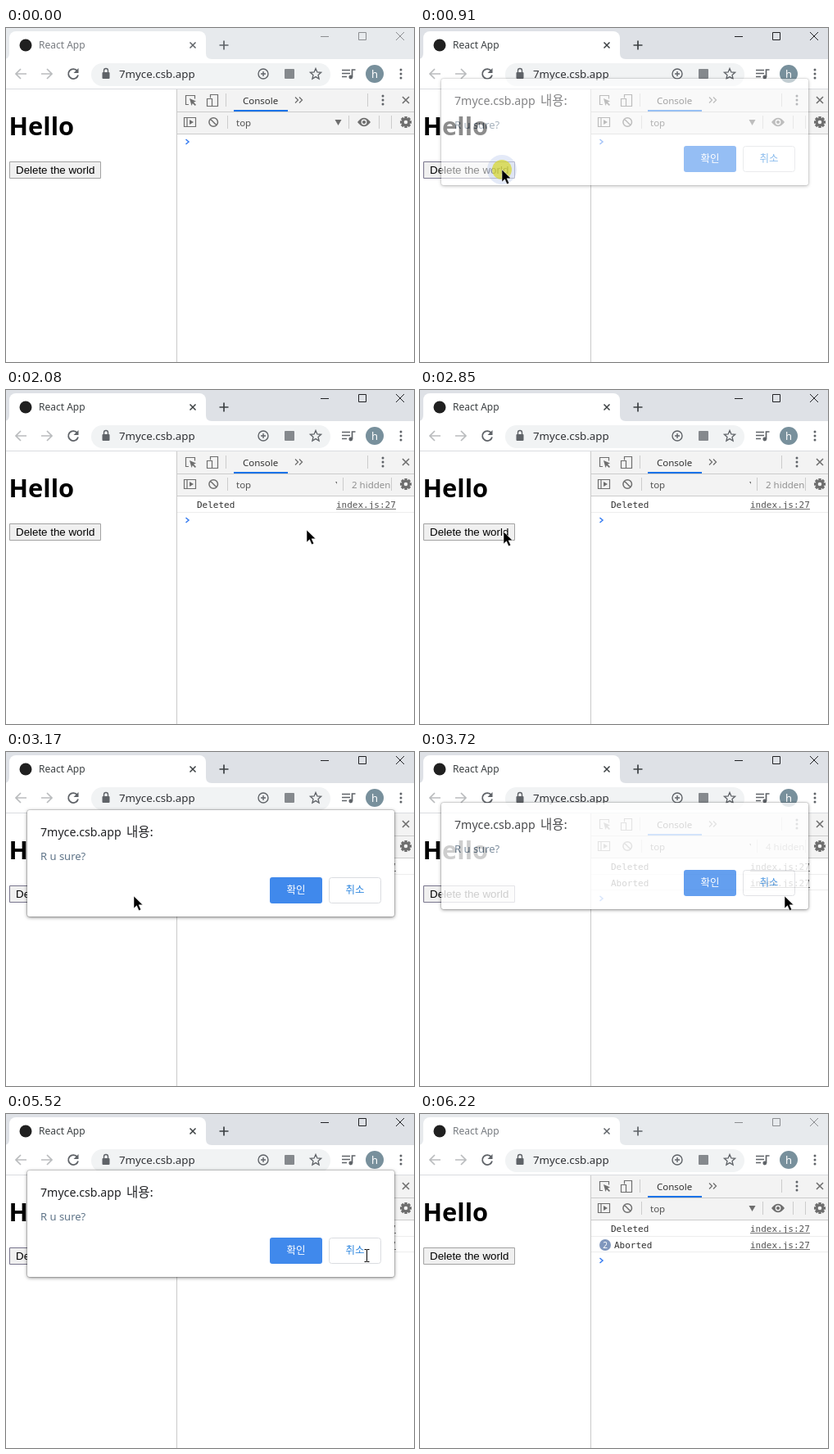
These frames come from a looping animation (498 px wide and 408 px high, 6.3 s). An HTML page with a canvas:

```html
<!DOCTYPE html>
<html lang="ko">
<head>
<meta charset="utf-8">
<title>Confirm dialog</title>
<style>
html, body { margin: 0; width: 100%; height: 100%; overflow: hidden; background: #fff; }
canvas { display: block; width: 498px; height: 408px; }
</style>
</head>
<body>
<canvas id="stage" width="498" height="408"></canvas>
<script>
const stage = document.getElementById('stage').getContext('2d');
const layer = document.createElement('canvas');
layer.width = 498;
layer.height = 408;
const layerCtx = layer.getContext('2d');
let ctx = stage;

const LOOP = 6300;
const UI = '"Noto Sans", "Noto Sans CJK KR", sans-serif';
const KR = '"Noto Sans CJK KR", "Noto Sans CJK", sans-serif';
const MONO = '"DejaVu Sans Mono", monospace';
const GRAY = '#5f6368';

// open: first visible step, close: first closing step, gone: how long closing lasts
const dialogs = [
  { open: 902, close: 1840, gone: 220 },
  { open: 3013, close: 3639, gone: 220 },
  { open: 4733, close: 5515, gone: 150 }
];
const clicks = [750, 1680, 2930, 3560, 4650, 5350];
const moves = [
  { t0: 110, t1: 667, from: [209, 297], bend: [150, 215], to: [100, 173] },
  { t0: 980, t1: 1380, from: [100, 173], bend: [230, 178], to: [367, 171] },
  { t0: 2210, t1: 2850, from: [367, 171], bend: [240, 214], to: [102, 173] },
  { t0: 3040, t1: 3550, from: [102, 173], bend: [270, 183], to: [445, 176] },
  { t0: 3750, t1: 4570, from: [445, 176], bend: [250, 256], to: [64, 178] },
  { t0: 4890, t1: 5360, from: [64, 178], bend: [260, 184], to: [440, 173] }
];

function rect(x, y, w, h, color) {
  ctx.fillStyle = color;
  ctx.fillRect(x, y, w, h);
}

function box(x, y, w, h, r, fill, stroke) {
  ctx.beginPath();
  ctx.roundRect(x, y, w, h, r);
  if (fill) { ctx.fillStyle = fill; ctx.fill(); }
  if (stroke) { ctx.strokeStyle = stroke; ctx.lineWidth = 1; ctx.stroke(); }
}

function disc(x, y, r, color) {
  ctx.beginPath();
  ctx.arc(x, y, r, 0, Math.PI * 2);
  ctx.fillStyle = color;
  ctx.fill();
}

function line(d, color = GRAY, width = 1.5) {
  ctx.strokeStyle = color;
  ctx.lineWidth = width;
  ctx.stroke(new Path2D(d));
}

function shape(d, color = GRAY) {
  ctx.fillStyle = color;
  ctx.fill(new Path2D(d));
}

function text(str, x, y, font, color, align = 'left') {
  ctx.font = font;
  ctx.fillStyle = color;
  ctx.textAlign = align;
  ctx.fillText(str, x, y);
}

function cross(x, y, r, color, width) {
  line(`M${x - r} ${y - r}l${2 * r} ${2 * r}m0 ${-2 * r}l${-2 * r} ${2 * r}`, color, width);
}

function dots(x, y, gap) {
  for (let i = -1; i <= 1; i++) disc(x, y + i * gap, 1.5, GRAY);
}

function drawTabs(active) {
  const ink = active ? '#202124' : '#8b8d90';
  rect(0, 0, 498, 38, active ? '#dee1e6' : '#e7eaed');
  box(4, 4, 240, 40, [8, 8, 0, 0], '#fff');
  shape('M4 31q0 7-7 7h7zM244 31q0 7 7 7h-7z', '#fff');
  disc(24, 21, 7.5, '#202020');
  text('React App', 40, 25, '12px ' + UI, active ? '#3c4043' : '#777b80');
  cross(228, 21, 3.5, active ? '#3c4043' : GRAY, 1.5);
  line('M260.5 21h11M266 15.5v11', active ? '#3c4043' : GRAY, 1.7);
  line('M384 10.5h10M430.5 5.5h9v9h-9zM476 5l10 10m0-10l-10 10', ink, 1);
}

function drawAddressBar() {
  rect(0, 38, 498, 37, '#fff');
  rect(0, 74, 498, 1, '#dadce0');
  line('M25 56H12m6-6l-6 6 6 6M43 56h13m-6-6l6 6-6 6', '#babcbe', 1.7);
  line('M87 52.5a6 6 0 1 0 1 5', GRAY, 1.8);
  shape('M88.5 49v6h-6z');
  box(104, 43, 292, 28, 14, '#f1f3f4');
  box(117.5, 54, 9, 8, 1, GRAY);
  line('M119.5 54v-2a2.5 2.5 0 0 1 5 0v2', GRAY, 1.4);
  text('7myce.csb.app', 138, 61, '13.3px ' + UI, '#303236');
  line('M320 56a6 6 0 1 0-12 0a6 6 0 1 0 12 0M311 56h6m-3-3v6', GRAY, 1.4);
  box(340, 50, 12, 12, 1, '#85898d');
  line('M378 49.5l1.9 4.4 4.7.4-3.6 3.1 1.1 4.7-4.1-2.5-4.1 2.5 1.1-4.7-3.6-3.1 4.7-.4z', GRAY, 1.3);
  line('M410 51.5h10M410 55.5h10M410 59.5h6M422.5 60v-9h4', GRAY, 1.7);
  disc(420.8, 60, 2.4, GRAY);
  disc(450, 56, 11, '#78909c');
  text('h', 450, 60.5, '13px ' + UI, '#fff', 'center');
  dots(482, 56, 5);
}

function drawPage(pressed) {
  text('Hello', 3.5, 131, 'bold 30.8px ' + UI, '#000');
  box(4.5, 163.5, 111, 20, 0, '#f0f0f0', pressed ? '#77748c' : '#a2a2a2');
  text('Delete the world', 12, 178, '13.33px "Liberation Sans", Arial, sans-serif', '#000');
}

function drawGear(x, y) {
  for (let i = 0; i < 4; i++) {
    ctx.save();
    ctx.translate(x, y);
    ctx.rotate(i * Math.PI / 4);
    rect(-1.7, -7, 3.4, 14, '#6e6e6e');
    ctx.restore();
  }
  disc(x, y, 5.2, '#6e6e6e');
  disc(x, y, 2.3, '#f3f3f3');
}

function drawToolbars(hidden) {
  const divider = (x, y) => rect(x, y, 1, 16, '#ccc');
  rect(208, 75, 1, 333, '#cacaca');
  rect(209, 75, 289, 55, '#f3f3f3');
  rect(209, 102, 289, 1, '#ccc');
  rect(209, 129, 289, 1, '#ccc');

  line('M223 93.5h-3.5v-11h11v4', '#6e6e6e', 1.2);
  shape('M224 86l8 3.5-3 1.3 3 3-1.2 1.2-3-3-1.3 3z', '#6e6e6e');
  line('M249.5 85.5v-4h9v14h-7M245.5 86.5h6v9h-6z', '#6e6e6e', 1.2);
  divider(268, 80);
  text('Console', 289, 93, '11.5px ' + UI, '#333');
  rect(278, 100, 66, 2, '#1a73e8');
  line('M353 84.5l3.5 3.5-3.5 3.5M358 84.5l3.5 3.5-3.5 3.5', '#6e6e6e', 1.3);
  divider(441, 80);
  dots(460, 88, 5);
  cross(488, 88, 4, '#6e6e6e', 1.6);

  line('M217.5 109.5h14v11h-14zM221 109v12', '#6e6e6e', 1.2);
  shape('M224 112l5 3-5 3z', '#6e6e6e');
  line('M258.5 115a5.3 5.3 0 1 0-10.6 0a5.3 5.3 0 1 0 10.6 0M249.5 111.3l7.4 7.4', '#6e6e6e', 1.5);
  divider(270, 107);
  text('top', 281, 120, '11.5px ' + UI, '#555');
  if (hidden) {
    shape('M402 112h2v3z', '#6e6e6e');
    divider(411, 107);
    text(hidden + ' hidden', 422, 120, '11.5px ' + UI, '#919191');
  } else {
    shape('M401.5 112h8l-4 7z', '#6e6e6e');
    divider(418, 107);
    shape('M429 115q8-10.5 16 0q-8 10.5-16 0', '#6e6e6e');
    disc(437, 115, 3.4, '#f3f3f3');
    disc(437, 115, 2.1, '#6e6e6e');
    divider(455, 107);
  }
  divider(470, 107);
  drawGear(488, 115);
}

function drawConsole(runs) {
  const rows = Math.min(runs, 2);
  ['Deleted', 'Aborted'].slice(0, rows).forEach((message, i) => {
    const y = 144 + i * 20;
    const counted = i === 1 && runs === 3;
    if (counted) {
      disc(226, y - 4, 7, '#8097bd');
      text('2', 226, y, '10px ' + UI, '#fff', 'center');
    }
    text(message, counted ? 237 : 233, y, '11px ' + MONO, '#303030');
    text('index.js:27', 403, y, '11px ' + MONO, '#545454');
    rect(403, y + 1, 73, 1, '#777');
    rect(209, 149 + i * 19, 289, 1, '#ededed');
  });
  const y = 139 + rows * 20;
  line(`M219.5 ${y - 3}l3.5 3-3.5 3`, '#367cf1', 1.5);
}

function drawDialog(y, hover) {
  ctx.shadowColor = 'rgba(0,0,0,.5)';
  ctx.shadowBlur = 4;
  ctx.shadowOffsetY = 1;
  box(26, y, 448, 130, 3, '#fff');
  ctx.shadowColor = 'transparent';
  box(25.5, y - .5, 449, 131, 3, null, 'rgba(0,0,0,.12)');
  text('7myce.csb.app', 42, y + 32, '14.2px ' + UI, '#202124');
  text('내용:', 147, y + 32, '15.5px ' + KR, '#202124');
  text('R u sure?', 42, y + 61, '13px ' + UI, '#5f7488');
  if (hover) box(321, y + 81, 66, 34, 4, '#a9c9f6');
  box(322, y + 82, 64, 32, 3, hover ? '#4990ed' : '#4089ec');
  text('확인', 354, y + 102, '12.5px ' + KR, '#fff', 'center');
  box(394.5, y + 82.5, 63, 31, 3, '#fff', '#dadce0');
  text('취소', 426, y + 102, '12.5px ' + KR, '#2d86df', 'center');
}

// Fades the dialog as one group, so its parts do not show through each other.
function fadeDialog(pose, hover) {
  ctx = layerCtx;
  ctx.clearRect(0, 0, 498, 408);
  drawDialog(pose.y, hover);
  ctx = stage;
  ctx.globalAlpha = pose.alpha;
  ctx.drawImage(layer, 0, 0);
  ctx.globalAlpha = 1;
}

function dialogPose(d, t) {
  const closing = t - d.close;
  if (t < d.open || closing > d.gone) return null;
  if (closing >= -5) {
    const u = Math.max(0, closing);
    return { y: Math.round(69 - u * .085), alpha: 1 - .2 * (u / 80) ** 1.6 };
  }
  const s = Math.min(1, (t - d.open) / 156);
  return { y: Math.round(71 - 9 * (1 - s) ** 2), alpha: .55 + .45 * s };
}

function pointer(t) {
  const move = moves.filter(m => t >= m.t0).pop();
  const s = Math.min(1, (t - move.t0) / (move.t1 - move.t0));
  const e = s * s * (3 - 2 * s);
  return [0, 1].map(i => Math.round((1 - e) ** 2 * move.from[i]
    + 2 * e * (1 - e) * move.bend[i] + e * e * move.to[i]));
}

function drawPointer(t) {
  if (t < 110 || t >= 5980) return;
  const [x, y] = pointer(t);
  if (clicks.some(c => t >= c && t < c + 155)) {
    disc(x, y, 18, 'rgba(120,150,220,.2)');
    disc(x, y, 12, 'rgba(214,214,24,.65)');
  }
  ctx.save();
  if (t > 5500) {
    ctx.translate(x + .5, t > 5890 ? y + 4 : y);
    line('M-3 -7.5h2.5l.5 1 .5-1h2.5M0 -7v14M-3 7.5h2.5l.5-1 .5 1h2.5', '#000', 1);
  } else {
    ctx.translate(x, y);
    const arrow = 'M0 0v15l3.5-3.3 2.7 6 2.5-1.1-2.6-5.8h4.9z';
    shape(arrow, '#000');
    line(arrow, 'rgba(255,255,255,.75)', .7);
  }
  ctx.restore();
}

function draw(time) {
  const t = time < 120 ? 0 : 120 + 78.2 * Math.floor((time - 108) / 78.2);
  const runs = dialogs.filter(d => t >= d.close + 60).length;
  const pose = dialogs.map(d => dialogPose(d, t)).find(Boolean);
  rect(0, 0, 498, 408, '#fff');
  drawTabs(t >= 820 && t < 6210);
  drawAddressBar();
  drawPage(t >= 750 && pose);
  drawToolbars([0, 2, 4, 0][runs]);
  drawConsole(runs);
  if (pose) fadeDialog(pose, t > 1440 && t < 1900);
  drawPointer(t);
}

const start = performance.now();
function tick() {
  draw((performance.now() - start) % LOOP);
  requestAnimationFrame(tick);
}
tick();
</script>
</body>
</html>
```
